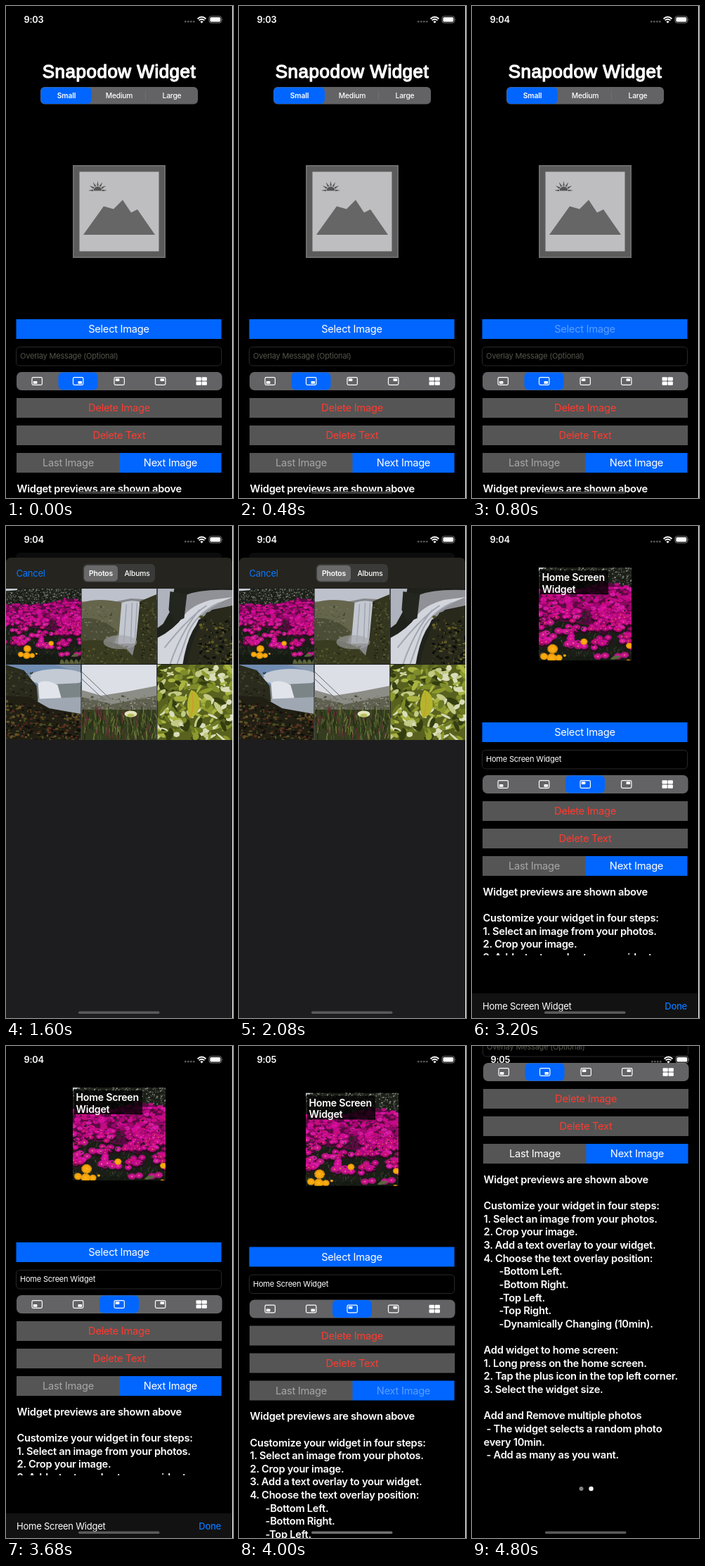
Animation, 323 px wide and 699 px high, one loop 5.6 s. Source, as an HTML page:

```html
<!DOCTYPE html>
<html lang="en">
<head>
<meta charset="utf-8">
<title>Widget walkthrough</title>
<style>
  html, body { margin: 0; width: 100%; height: 100%; overflow: hidden; background: #000; }
  #stage { display: block; width: 323px; height: 699px; }
  text { font-family: Inter, "Liberation Sans", sans-serif; letter-spacing: -.018em; }
  .title { font-family: "Liberation Sans", Arial, sans-serif; letter-spacing: .5px;
           stroke: #fff; stroke-width: 1.3; stroke-linejoin: round; }
</style>
</head>
<body>
<svg id="stage" xmlns="http://www.w3.org/2000/svg" viewBox="0 0 323 699"></svg>
<script>
const STEP = 800;
const BLUE = '#0066ff', GREY = '#555', SEG = '#636366', RED = '#ff3b30';
const BODY = 14.65, LINE = 18.64;

// ---- helpers ----
const rect = (x, y, w, h, fill, r = 0, extra = '') =>
  `<rect x="${x}" y="${y}" width="${w}" height="${h}" rx="${r}" fill="${fill}" ${extra}/>`;
const oval = (x, y, rx, ry, fill, extra = '') =>
  `<ellipse cx="${x}" cy="${y}" rx="${rx}" ry="${ry}" fill="${fill}" ${extra}/>`;
const path = (d, fill, extra = '') => `<path d="${d}" fill="${fill}" ${extra}/>`;
const stroke = (d, color, width, extra = '') =>
  path(d, 'none', `stroke="${color}" stroke-width="${width}" ${extra}`);
const group = (x, y, body) => `<g transform="translate(${x} ${y})">${body}</g>`;
const crop = (x, y, w, h, box, body) =>
  `<svg x="${x}" y="${y}" width="${w}" height="${h}" viewBox="${box}" preserveAspectRatio="none">${body}</svg>`;

// cy is the optical middle of the capitals
function text(x, cy, str, { size = BODY, fill = '#fff', weight = 400, anchor = 'start', cls = '' } = {}) {
  return `<text x="${x}" y="${(cy + size * .36).toFixed(2)}" font-size="${size}" fill="${fill}" ` +
    `font-weight="${weight}" text-anchor="${anchor}" class="${cls}">${str}</text>`;
}
const label = (x, cy, str, opt = {}) => text(x, cy, str, { ...opt, anchor: 'middle' });

function seeded(seed) {
  return (a = 0, b = 1) => {
    seed = (seed * 16807) % 2147483647;
    return +(a + (b - a) * seed / 2147483647).toFixed(2);
  };
}
function scatter(seed, n, draw) {
  const rnd = seeded(seed);
  return Array.from({ length: n }, (_, i) => draw(rnd, i)).join('');
}
const pick = (rnd, list) => list[Math.floor(rnd() * list.length) % list.length];

// ---- pictures ----
function petals(x, y, rx, ry, color, core) {
  const ring = `stroke="${color}" stroke-width="${(ry * .8).toFixed(1)}" stroke-dasharray="1.7 .7"`;
  return oval(x, y, rx * .62, ry * .62, color, ring) + oval(x, y, rx * .16, ry * .18, core);
}

function flowerBed() {
  let s = rect(-60, 0, 420, 350, '#1a1e17');
  s += scatter(11, 900, r =>
    oval(r(-60, 340), r(0, 82), r(1, 4), r(1, 3.2), pick(r, ['#454a42', '#5d6258', '#7b8076', '#2a2e26', '#8d9188', '#3a4036', '#20241c'])));
  s += path('M-60 0H20L12 6L5 4L0 14L-60 18Z', '#c3c9d2');
  s += path('M-60 78L60 80L130 76L200 60L240 52L340 74V200L250 215L120 190L-60 175Z', '#5a0a42');
  s += scatter(5, 330, r => {
    const x = r(-60, 340), y = r(165, 350);
    return stroke(`M${x} ${y}l${r(-8, 8)} ${r(-16, -6)}`, pick(r, ['#2f3d26', '#3d4a32', '#222b1e', '#4c5642', '#12160f']), 2);
  });
  s += scatter(29, 760, (r, i) => {
    const k = i / 760, x = r(-60, 340), y = +(58 + 212 * k + r(-8, 8)).toFixed(1);
    const edge = 78 - 28 * Math.exp(-(((x - 242) / 70) ** 2));
    const sparse = y > 175 + 40 * (x > 190);
    const gap = Math.sin(x * .06 + 1) + Math.sin(y * .11 + x * .02);
    if (y < edge || (sparse && (gap < .1 || r() < .35))) return '';
    const color = pick(r, ['#c70a8c', '#d90f9f', '#b4087c', '#cf0c92', '#9c076c', '#c80d7c', '#dd1ea9']);
    const rx = 8 + 5 * k + r(0, 6), ry = 4 + 5 * k + r(0, 2);
    return oval(x, y + ry * .8, rx, ry * .8, k > .5 ? '#2c0a20' : '#5c0841', 'opacity=".8"') +
      petals(x, y, rx, ry, color, k > .45 ? '#e58a5a' : '#8d0d65');
  });
  s += scatter(61, 150, r =>
    oval(r(-60, 340), r(85, 290), r(2, 6), r(1, 3), pick(r, ['#1d2218', '#2c3524', '#33121f', '#15180f'])));
  s += rect(-60, 308, 420, 42, '#11170f', 0, 'opacity=".6"');
  const pinks = [[15, 232], [40, 190], [68, 219], [50, 238], [137, 272], [205, 308], [230, 305], [275, 307], [298, 303], [120, 262], [100, 265]];
  s += pinks.map(([x, y]) => petals(x, y, 16, 11, '#cf1593', '#f0a060')).join('');
  for (let x = 210; x < 340; x += 22)
    s += path(`M${x - 13} 352Q${x - 13} 336 ${x - 5} 329Q${x + 9} 338 ${x + 10} 352Z`, '#5d633a', 'stroke="#363c22"');
  s += path('M248 318Q260 300 285 307Q275 322 248 318Z', '#59663f');
  const golds = [[48, 282, 19], [18, 308, 14], [45, 313, 18], [70, 313, 13], [157, 257, 13], [90, 305, 5], [314, 271, 12], [311, 328, 11]];
  s += golds.map(([x, y, r]) => oval(x, y, r * .8, r * .75, '#e08c08') + petals(x, y, r, r * .85, '#f9a80e', '#ffbf2a')).join('');
  return s;
}

// small specks that roughen a patch of a picture
const specks = (seed, n, [x0, y0, x1, y1], colors, size = 2) =>
  scatter(seed, n, r => oval(r(x0, x1), r(y0, y1), r(.6, size), r(.5, size * .8), pick(r, colors)));

const waterfall = () =>
  rect(0, 0, 107, 107, '#85868a') + path('M0 0H107V16L70 14L30 22L0 18Z', '#bcc1cb') +
  path('M0 20Q25 12 58 20L56 62L40 85L0 78Z', '#65654c') + path('M0 42Q30 40 52 62L38 88L0 82Z', '#4b4d36') +
  specks(3, 90, [0, 24, 48, 80], ['#565640', '#73725a', '#45462f']) +
  path('M57 20Q70 15 84 19L80 78H52Z', '#c3c7d0') + stroke('M64 22L60 76M72 20L70 76M79 20L76 72', '#9ea3ae', 1.4) +
  path('M83 18L107 8V107H70L78 70Z', '#33351f') +
  specks(9, 90, [84, 20, 107, 100], ['#4c4d2b', '#5b5b34', '#22240f']) +
  path('M0 74Q38 70 62 84L84 107H0Z', '#393c20') + specks(13, 70, [0, 80, 66, 107], ['#2a2d15', '#4c5029', '#5b5c31']) +
  oval(55, 76, 24, 10, '#a3a6aa', 'opacity=".6"');

const cascade = () =>
  rect(0, 0, 107, 107, '#1f211b') + path('M0 0H24L18 32L8 50L0 56Z', '#aeb3bd') +
  path('M38 10Q60 0 107 2V24L78 30L60 44L36 44Z', '#8f9196') +
  path('M107 12L78 24Q62 34 55 52Q42 70 36 107H0V70Q24 58 38 38Q48 24 76 16Z', '#d3d5dc') +
  stroke('M88 20Q55 36 44 62L28 107M70 24Q45 40 10 84M60 30Q34 60 18 107', '#a2a6b0', 2) +
  path('M18 4L42 8L38 42L24 48L16 30Z', '#23261e') + path('M70 34L107 24V107H42Q48 72 70 34Z', '#29291b') +
  specks(7, 130, [60, 40, 107, 107], ['#4b4c1f', '#6a6426', '#11130c', '#3d3a24', '#0c0d09'], 3);

const river = () =>
  rect(0, 0, 107, 107, '#8b9bb0') + path('M0 0H70L107 12V30H0Z', '#718db2') + oval(74, 18, 40, 12, '#c3cad4') +
  path('M24 30L107 26V60H30Z', '#7b8486') + path('M46 26Q58 20 74 29L80 50H48Z', '#e1e4ea') +
  path('M40 49L107 46V72H46Z', '#9fa7b2') + path('M0 0L26 8L44 30L46 52L0 60Z', '#2a2b1c') +
  specks(19, 60, [0, 10, 38, 52], ['#3c3d28', '#1a1b10', '#4a4930']) +
  path('M0 44L34 46L62 62L107 70V107H0Z', '#211f14') +
  scatter(17, 260, r => {
    const x = r(0, 107);
    return oval(x, r(50 + x * .2, 107), r(.8, 3), r(.6, 2), pick(r, ['#55421d', '#5c2a20', '#46501f', '#14130c', '#64552a', '#0f0f0a']));
  });

const meadow = () =>
  rect(0, 0, 107, 107, '#dcdfe6') + path('M0 36L28 44L66 38L107 30V76H0Z', '#8c8d86') + path('M0 46L44 56L107 44V80H0Z', '#5f6050') +
  specks(31, 130, [0, 44, 107, 66], ['#77786a', '#4c4d3c', '#8d8e80']) +
  stroke('M0 10L42 50M0 20L32 50', '#66696c', 1) + rect(0, 64, 107, 43, '#343d1f') +
  scatter(23, 240, r => stroke(`M${r(0, 107)} ${r(70, 109)}l${r(-3, 3)} ${r(-15, -5)}`, pick(r, ['#5f6c30', '#7a823f', '#20290f', '#6d2f3a', '#48582a', '#2a331a']), 1.1)) +
  oval(70, 70, 9, 4.5, '#e3e4bd') + oval(70, 72, 5, 2.5, '#b7c05c');

const leaves = () =>
  rect(0, 0, 107, 107, '#58611e') +
  scatter(41, 200, r => {
    const x = r(0, 107), y = r(0, 107);
    return oval(x, y, r(3, 11), r(1.5, 4.5), pick(r, ['#8d9a2d', '#a9b442', '#6c7a22', '#333d10', '#c3ca86', '#7e8c2a', '#d9dcb8']), `transform="rotate(${r(-80, 80)} ${x} ${y})"`);
  }) + path('M48 36Q62 40 60 60Q56 74 46 76Q38 56 48 36Z', '#b5b52d') + stroke('M49 40Q53 58 47 74', '#d09a2c', 1.5);

const bed = '<use href="#bed"/>';

// ---- interface parts ----
function status(time) {
  let s = text(25.5, 19.5, time, { size: 12.8, weight: 600 });
  for (let i = 0; i < 4; i++) s += oval(255.3 + 4 * i, 22.2, 1.4, 1.4, '#555');
  s += stroke('M272.6 18.2Q278.5 12.8 284.4 18.2M274.6 20.4Q278.5 17 282.4 20.4', '#fff', 1.9);
  s += path('M276.3 22.2Q278.5 20.3 280.7 22.2L278.5 24.6Z', '#fff');
  s += rect(289, 14.6, 17.6, 9.4, 'none', 2.8, 'stroke="#888" stroke-width=".9"');
  return s + rect(290.4, 16, 14.8, 6.6, '#fff', 1.6) + path('M307.7 17.8Q309.2 19.3 307.7 20.8Z', '#888');
}
const home = color => rect(103, 689.5, 115.5, 3.6, color, 1.8);

function button(x, y, w, str, fill, ink) {
  return rect(x, y, w, 28, fill) + label(x + w / 2, y + 14.2, str, { fill: ink });
}

function cornerIcon(i, cx, cy) {
  if (i === 4)
    return [[-7.7, -5.7], [.4, -5.7], [-7.7, .4], [.4, .4]].map(([x, y]) => rect(cx + x, cy + y, 7.3, 5.3, '#fff', 1)).join('');
  const dx = [-5.4, -.2, -5.4, -.2][i], dy = [.1, .1, -3.8, -3.8][i];
  return rect(cx - 7.2, cy - 5.4, 14.4, 10.8, 'none', 1.8, 'stroke="#fff" stroke-width="1.2"') +
    rect(cx + dx, cy + dy, 5.6, 3.7, '#fff', .6);
}
function corners(y, active) {
  let s = rect(15, y, 292.5, 26, SEG, 7) + rect(15 + 58.5 * active + 1, y + .5, 56, 25, BLUE, 6);
  for (let i = 0; i < 5; i++) s += cornerIcon(i, 44.2 + 58.5 * i, y + 13);
  return s;
}

const GUIDE = [
  'Widget previews are shown above', '',
  'Customize your widget in four steps:', '1. Select an image from your photos.', '2. Crop your image.',
  '3. Add a text overlay to your widget.', '4. Choose the text overlay position:',
  '\t-Bottom Left.', '\t-Bottom Right.', '\t-Top Left.', '\t-Top Right.', '\t-Dynamically Changing (10min).', '',
  'Add widget to home screen:', '1. Long press on the home screen.', '2. Tap the plus icon in the top left corner.',
  '3. Select the widget size.', '',
  'Add and Remove multiple photos', ' - The widget selects a random photo', 'every 10min.', ' - Add as many as you want.'
];
function guide() {
  const indent = { '\t': 22, ' ': 4 };
  return GUIDE.map((str, i) =>
    text(15.6 + (indent[str[0]] || 0), 685.5 + LINE * i, str.trim(), { weight: 600 })).join('');
}

function form({ dy = 0, active = 1, message = '', dimSelect, dimNext, last = '#a6a6a6' }) {
  const dim = '#5c9eff';
  return group(0, dy,
    button(14.5, 445, 292, 'Select Image', BLUE, dimSelect ? dim : '#fff') +
    rect(14.5, 484.5, 292, 26.5, '#000', 5, 'stroke="#292929"') +
    text(20, 497.5, message || 'Overlay Message (Optional)', { size: 11, fill: message ? '#fff' : '#55554c' }) +
    corners(520, active) +
    button(15, 557, 292, 'Delete Image', GREY, RED) +
    button(15, 596, 292, 'Delete Text', GREY, RED) +
    button(15, 635, 147, 'Last Image', GREY, last) +
    button(161.5, 635, 145, 'Next Image', BLUE, dimNext ? dim : '#fff') +
    guide());
}

function sizes() {
  const opt = { size: 10.3, weight: 500 };
  return label(161, 92.5, 'Snapodow Widget', { size: 26, cls: 'title' }) +
    rect(49, 115, 224, 24.5, SEG, 6) + rect(49.5, 115.5, 72.5, 23.5, BLUE, 6) +
    rect(198, 121, .8, 13, '#737376') +
    label(86, 127.5, 'Small', { ...opt, weight: 600 }) + label(161, 127.5, 'Medium', opt) + label(236, 127.5, 'Large', opt);
}

function placeholder() {
  let s = rect(95, 226, 132, 132, '#6c6c6c') + rect(97, 228, 128, 128, '#5b5b5b') + rect(104.5, 235.5, 113, 113, '#bebec0');
  s += path('M110 325L139 284.5L153 288.5L166 275.5L178 293.5L187 289L212 325Z', '#666');
  s += path('M124.5 262.5A6 6 0 0 1 136.5 262.5Z', '#555');
  for (let a = 0; a <= 180; a += 30)
    s += `<path d="M6.5 -1.3L13.5 0L6.5 1.3Z" fill="#555" transform="translate(130.5 262) rotate(${-a})"/>`;
  return s;
}

const preview = y => crop(95, y, 132, 132, '0 0 322 322', bed) +
  rect(97, y + 4, 97, 34, '#000', 0, 'opacity=".8"') +
  ['Home Screen', 'Widget'].map((str, i) => text(99.5, y + 14 + 16.7 * i, str, { size: 14.2, weight: 600 })).join('');

function library() {
  let s = rect(14, 38, 293, 20, '#0c0c0c', 6) + rect(0, 45, 322, 654, '#1d1d1f', 8) + rect(0, 690, 322, 9, '#1d1d1f') +
    path('M0 89V53Q0 45 8 45H314Q322 45 322 53V89Z', '#25241f');
  s += text(14.5, 67.5, 'Cancel', { size: 13, fill: '#0a78ff' });
  s += rect(109.5, 54, 102.5, 26, '#3a3a38', 6) + rect(111, 56, 48, 22.5, '#69696a', 5);
  s += label(135, 67.3, 'Photos', { size: 10.4, weight: 600 }) + label(186.5, 67.3, 'Albums', { size: 10.3, weight: 500 });
  s += rect(0, 88.5, 322, 215.5, '#1d1d1f');
  const thumbs = [`<g transform="translate(16 -2) scale(.31)">${bed}</g>`, waterfall(), cascade(), river(), meadow(), leaves()];
  return s + thumbs.map((pic, i) =>
    crop(108 * (i % 3) - .5, i < 3 ? 89 : 197, 107, 107, '0 0 107 107', pic)).join('');
}

function cropper() {
  return rect(14, 38, 293, 7.5, '#131313', 4) +
    crop(0, 210, 322, 350, '0 0 322 350', bed) +
    rect(0, 534, 322, 26, '#000', 0, 'opacity=".25"') +
    rect(0, 210, 322, 1, '#777') + rect(0, 533.5, 322, 1, '#8a8a86') +
    rect(0, 616, 322, 83, '#121212') +
    text(9, 645, 'Cancel', { size: 13.4 }) + text(311.5, 645, 'Choose', { size: 13.4, anchor: 'end' });
}

const keyboardBar = () => rect(0, 610, 322, 54, '#000') + rect(0, 664, 322, 35, '#121212') +
  text(15, 682.5, 'Home Screen Widget', { size: 13 }) +
  text(306, 682.5, 'Done', { size: 13, weight: 500, fill: '#0a78ff', anchor: 'end' });

// ---- scenes, one per step ----
const message = 'Home Screen Widget';
const edge = rect(322, 0, 1, 699, '#fff');
const scenes = [
  sizes() + placeholder() + form({}) + home('#3c3c3c') + status('9:03') + edge,
  sizes() + placeholder() + form({ dimSelect: true }) + home('#3c3c3c') + status('9:04') + edge,
  library() + home('#5a5a5a') + status('9:04') + edge,
  cropper() + home('#5a5a5a') + status('9:04') + edge,
  preview(59) + form({ dy: -166, active: 2, message }) + keyboardBar() + home('#5a5a5a') + status('9:04') + edge,
  preview(66.5) + form({ dy: -159.5, active: 2, message, dimNext: true }) + home('#707070') + status('9:05') + edge,
  group(1, 0, form({ dy: -496, last: '#fff' }) + oval(154.5, 629, 3, 3, '#808080') + oval(168.5, 629, 3.2, 3.2, '#fff') +
    home('#5a5a5a') + status('9:05'))
];

const stage = document.getElementById('stage');
stage.innerHTML = `<defs><g id="bed">${flowerBed()}</g></defs>` + rect(0, 0, 323, 699, '#000') +
  scenes.map(s => `<g class="scene" visibility="hidden">${s}</g>`).join('');
const layers = [...stage.querySelectorAll('.scene')];

const start = performance.now();
let shown = -1;
function show() {
  const now = Math.floor((performance.now() - start) / STEP) % layers.length;
  if (now !== shown) {
    layers.forEach((g, i) => g.setAttribute('visibility', i === now ? 'visible' : 'hidden'));
    shown = now;
  }
  requestAnimationFrame(show);
}
show();
</script>
</body>
</html>
```
